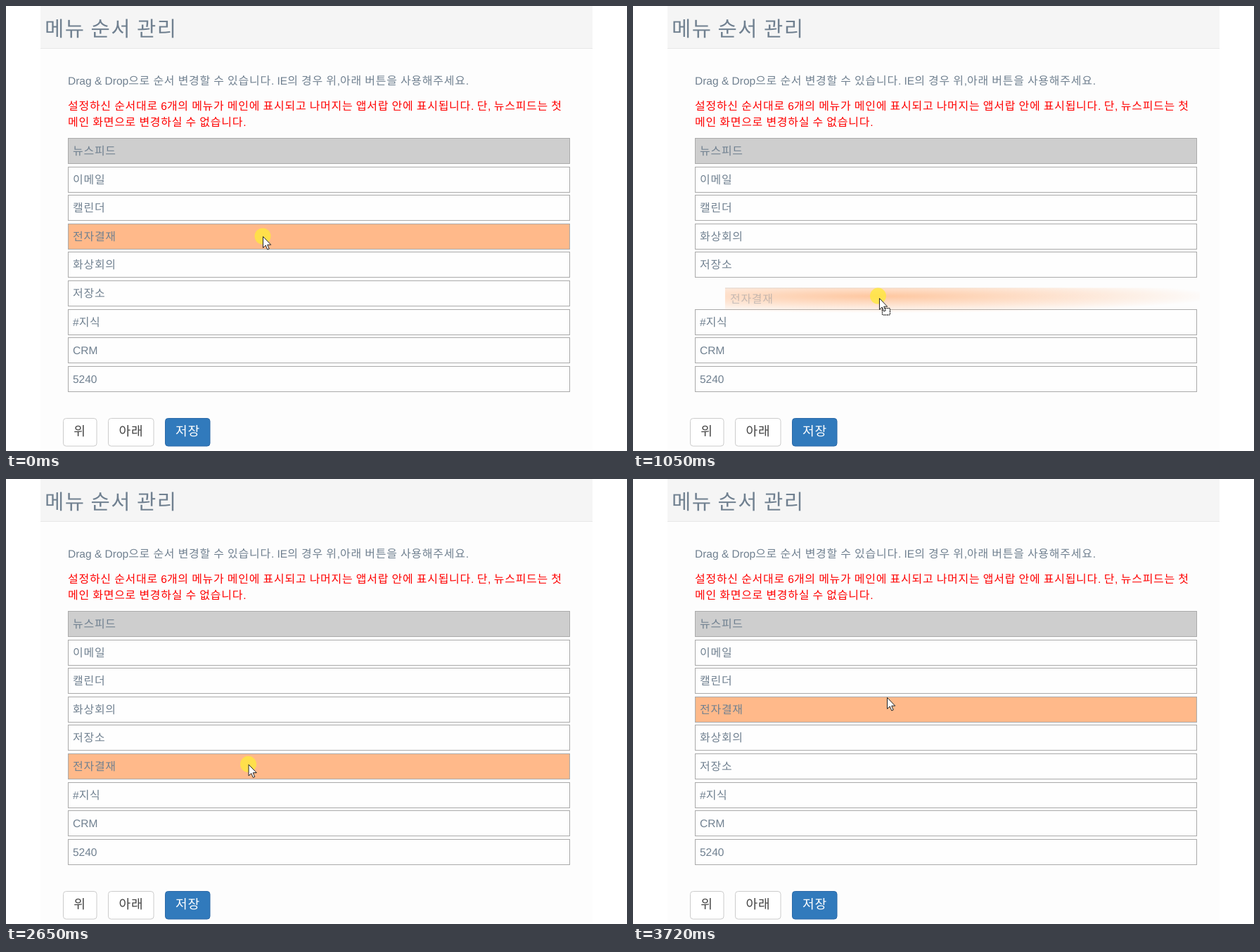
Recreate the animation shown at these times as an HTML page. Size 883 by 634 pixels, loop 4190 ms.

```html
<!DOCTYPE html>
<html lang="ko">
<head>
<meta charset="utf-8">
<style>
html, body { margin: 0; width: 100%; height: 100%; overflow: hidden; background: #fff; }
svg { display: block; width: 883px; height: 634px; }
text { font: 300 15.5px "Liberation Sans", "Noto Sans CJK KR", "Noto Sans CJK", sans-serif; fill: #708090; white-space: pre; text-rendering: geometricPrecision; }
.ko { font-family: "Noto Sans CJK KR", "Noto Sans CJK", sans-serif; font-size: 1.03em; letter-spacing: .0487em; }
.title { font-size: 28.8px; }
.red { fill: #f00; }
.btn rect { fill: #fff; stroke: #ccc; }
.btn text { font-size: 17.6px; fill: #444; text-anchor: middle; }
.btn.main rect { fill: #317abc; stroke: #2b69a8; }
.btn.main text { fill: #fff; }
.row rect { fill: #fefefe; stroke: #aaa; }
</style>
</head>
<body>
<svg viewBox="0 0 883 634">
  <defs>
    <radialGradient id="glow" gradientUnits="userSpaceOnUse" cx="0" cy="0" r="1" gradientTransform="translate(219 12) scale(480 24)">
      <stop offset="0" stop-color="#ffb988" stop-opacity=".8"/>
      <stop offset=".5" stop-color="#ffb988" stop-opacity=".4"/>
      <stop offset="1" stop-color="#ffb988" stop-opacity="0"/>
    </radialGradient>
    <linearGradient id="edge" gradientUnits="userSpaceOnUse" x1="0" x2="500" y1="0" y2="0">
      <stop stop-color="#999" stop-opacity=".3"/>
      <stop offset="1" stop-color="#999" stop-opacity="0"/>
    </linearGradient>
  </defs>
  <rect x="49" width="785" height="632" fill="#fdfdfd"/>
  <rect x="49" width="785" height="60" fill="#f5f5f5"/>
  <rect x="49" y="60" width="785" height="1" fill="#e7e7e7"/>
  <text class="title" x="55" y="43">메뉴 순서 관리</text>
  <text x="88" y="112">Drag &amp; Drop으로 순서 변경할 수 있습니다. IE의 경우 위,아래 버튼을 사용해주세요.</text>
  <text class="red" x="88" y="147.5">설정하신 순서대로 6개의 메뉴가 메인에 표시되고 나머지는 앱서랍 안에 표시됩니다. 단, 뉴스피드는 첫</text>
  <text class="red" x="88" y="170.5">메인 화면으로 변경하실 수 없습니다.</text>
  <g id="rows"></g>
  <g class="btn"><rect x="81.5" y="587.5" width="47.5" height="39.5" rx="4"/><text x="105" y="611.5">위</text></g>
  <g class="btn"><rect x="145.5" y="587.5" width="64.5" height="39.5" rx="4"/><text x="178" y="611.5">아래</text></g>
  <g class="btn main"><rect x="226.5" y="587.5" width="63.5" height="39.5" rx="4"/><text x="258.5" y="611.5">저장</text></g>
  <g id="ghost">
    <rect width="675" height="36" fill="url(#glow)"/>
    <rect width="500" height="1" fill="url(#edge)"/>
    <text x="7" y="22" opacity=".4">전자결재</text>
  </g>
  <circle id="disc" r="11.5" fill="#ffe83b" opacity=".8"/>
  <g id="cursor">
    <rect id="badge" x="4.5" y="14.5" width="11" height="9.5" rx="1" fill="#fff" stroke="#222" stroke-width="1.2" stroke-dasharray="2 .6"/>
    <path d="M.5 .5V16.5L4.2 13 6.8 19 9.2 18 6.7 12.2H11.7Z" fill="#fff" stroke="#222"/>
  </g>
</svg>
<script>
const LOOP = 4190;
const $ = id => document.getElementById(id);

// Pointer key points: time, x, y
const path = [[70, 365, 328], [570, 379.5, 388], [1050, 350, 416], [1380, 336, 426],
  [1980, 336, 426], [2310, 344.5, 406.5], [2650, 344.5, 406.5], [3110, 368, 328], [3330, 361, 311]];
const drags = [{ from: 130, to: 1580, grab: 219 }, { from: 2700, to: 3660, grab: 201 }];
const SETTLE = 60;

function pointer(t) {
  const next = path.findIndex(p => p[0] > t);
  if (next <= 0) return path.at(next).slice(1);
  const [t0, x0, y0] = path[next - 1], [t1, x1, y1] = path[next];
  const u = (t - t0) / (t1 - t0);
  return [x0 + (x1 - x0) * u, y0 + (y1 - y0) * u];
}
const move = (el, x, y) => el.setAttribute("transform", `translate(${x} ${y})`);
const show = (el, on) => el.setAttribute("visibility", on ? "visible" : "hidden");

const names = ["뉴스피드", "이메일", "캘린더", "화상회의", "저장소", "#지식", "CRM", "5240", "전자결재"];
$("rows").innerHTML = names.map(s =>
  `<g class="row"><rect x="88.5" width="713" height="36"/><text x="95" y="23.5">${s}</text></g>`).join("");
const rows = [...$("rows").children];
const dragRow = rows.pop();
rows[0].firstChild.style.fill = "#cecece";
dragRow.firstChild.style.fill = "#ffb98a";

// Hangul runs get their own font and tracking
for (const el of document.querySelectorAll("text"))
  el.innerHTML = el.innerHTML.replace(/[가-힣]+/g, '<tspan class="ko">$&</tspan>');

// The free slot moves down twice, then back up twice
const slot = t => 3 + (t >= 350) + (t >= 700) - (t >= 2840) - (t >= 3190);

function draw(t) {
  const order = [...rows];
  order.splice(slot(t), 0, dragRow);
  order.forEach((row, i) => move(row, 0, Math.floor(188.5 + 40.6 * i) + .5));

  const drag = drags.find(d => t >= d.from && t < d.to);
  const [x, y] = pointer(t);
  show(dragRow, !drag);
  show($("ghost"), drag);
  if (drag) move($("ghost"), x - drag.grab, pointer(t - 27)[1] - 13);

  move($("cursor"), x, y);
  show($("badge"), drags.some(d => t >= d.from && t < d.to + SETTLE));
  move($("disc"), x - (drag ? 1.5 : 0), y - (drag ? 3 : 0));
  show($("disc"), t < drags[0].to || t >= 2510 && t < drags[1].to);
}

const start = performance.now();
function frame(now) {
  draw(Math.max(0, now - start) % LOOP);
  requestAnimationFrame(frame);
}
draw(0);
requestAnimationFrame(frame);
</script>
</body>
</html>
```
